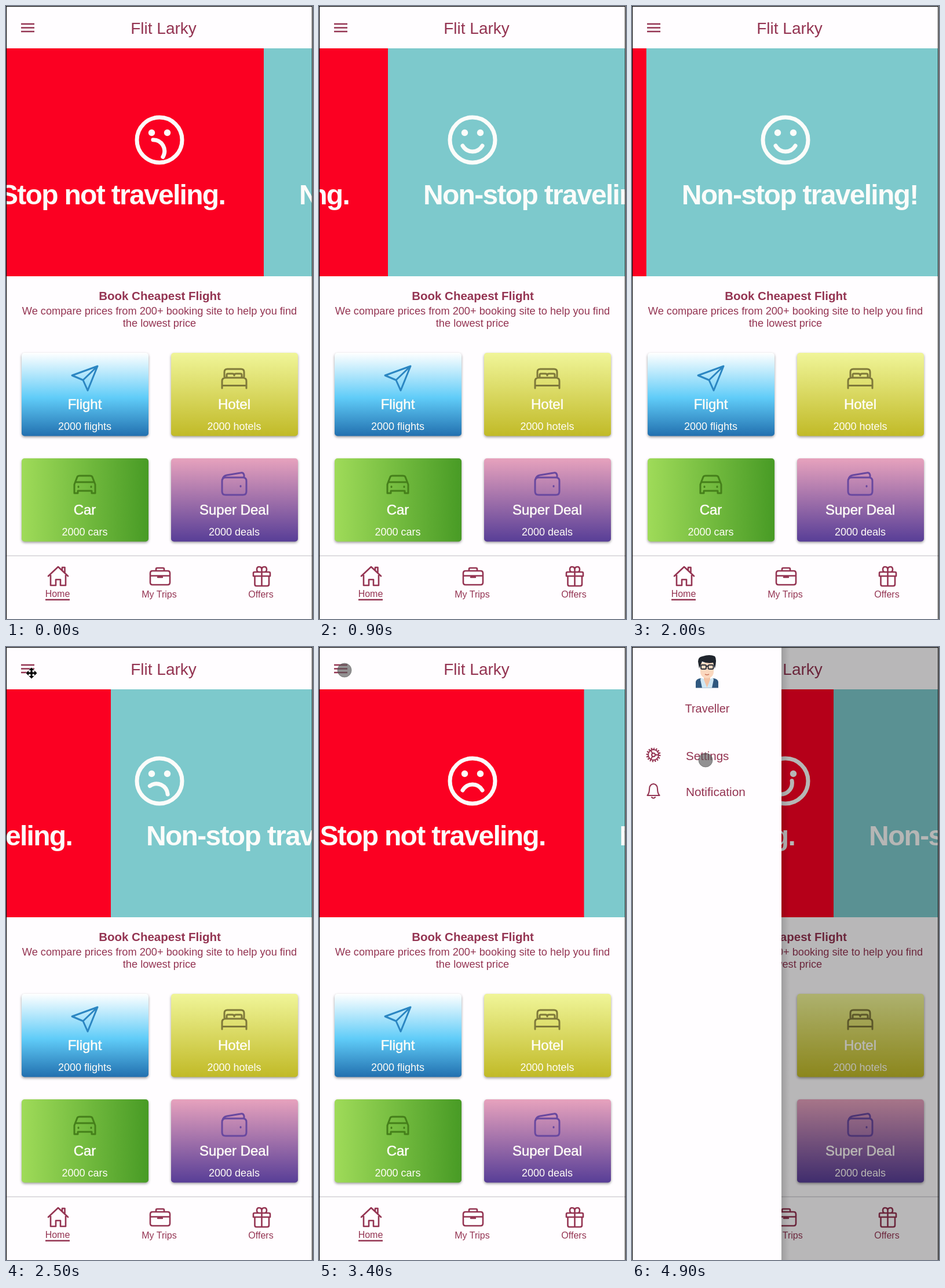
Animation, 530 px wide and 1057 px high, one loop 5000 ms. Source, as an HTML page:

```html
<!DOCTYPE html>
<html lang="en">
<head>
<meta charset="utf-8">
<title>Travel app</title>
<style>
  html, body { margin: 0; width: 100%; height: 100%; overflow: hidden; background: #fffdff; }
  svg { display: block; width: 100%; height: 100%; }
  text { font-family: "Liberation Sans", Arial, sans-serif; fill: #943452; }
  .mid { text-anchor: middle; }
  .line { fill: none; stroke: #943452; stroke-width: 2.6; stroke-linejoin: round; stroke-linecap: round; }
  .slogan { font-size: 48px; font-weight: bold; letter-spacing: -1.7px; fill: #fcfcfa; }
  .name { font-size: 24px; fill: #fffdf8; stroke: #fffdf8; stroke-width: .5; }
  .count { font-size: 18px; fill: #fffdf8; }
  .card { filter: drop-shadow(0 2px 2px rgba(0, 0, 0, .38)); }
  .white { fill: none; stroke: #fcfcfa; stroke-width: 7; stroke-linecap: round; }
</style>
</head>
<body>
<svg viewBox="0 0 530 1057" preserveAspectRatio="none">
  <defs>
    <linearGradient id="sky" x2="0" y2="1">
      <stop offset="0" stop-color="#fff"/><stop offset=".54" stop-color="#60ccf8"/><stop offset="1" stop-color="#2270af"/>
    </linearGradient>
    <linearGradient id="lime" x2="0" y2="1">
      <stop offset="0" stop-color="#f0f599"/><stop offset="1" stop-color="#c1ba27"/>
    </linearGradient>
    <linearGradient id="leaf">
      <stop offset="0" stop-color="#9fdb59"/><stop offset="1" stop-color="#489b25"/>
    </linearGradient>
    <linearGradient id="plum" x2="0" y2="1">
      <stop offset="0" stop-color="#e7a2bd"/><stop offset="1" stop-color="#583e97"/>
    </linearGradient>
    <linearGradient id="shade">
      <stop offset="0" stop-opacity=".14"/><stop offset="1" stop-opacity="0"/>
    </linearGradient>
    <clipPath id="window"><rect x="1" y="73" width="528" height="393"/></clipPath>
  </defs>

  <rect width="530" height="1057" fill="#fffdff"/>
  <path class="line" style="stroke-linecap:butt" d="M26 31H49M26 37.5H49M26 44H49"/>
  <text class="mid" x="272" y="48" font-size="28">Flit Larky</text>

  <g clip-path="url(#window)">
    <rect y="73" width="530" height="393" fill="#fb0022"/>
    <g id="strip">
      <rect y="73" width="560" height="393" fill="#7dc9cc"/>
      <text class="slogan" x="-456" y="342">Stop not traveling.</text>
      <text class="slogan" x="61" y="342">Non-stop traveling!</text>
    </g>
    <circle class="white" cx="265" cy="231" r="39"/>
    <circle cx="251.5" cy="218.5" r="5.7" fill="#fcfcfa"/>
    <circle cx="278.5" cy="218.5" r="5.7" fill="#fcfcfa"/>
    <path id="mouth" class="white" d="M248 247Q254 237 265 237T282 247"/>
  </g>

  <text class="mid" x="265.5" y="507" font-size="20.5" font-weight="bold">Book Cheapest Flight</text>
  <text class="mid" x="265" y="532" font-size="18.2">We compare prices from 200+ booking site to help you find</text>
  <text class="mid" x="265" y="552.5" font-size="18.2">the lowest price</text>

  <g id="cards"></g>

  <rect y="947" width="530" height="2" fill="#dedce0"/>
  <path class="line" d="M73 983L90 967L107 983M77 981V999H86V989H94V999H103V981M97 973V968H101.500V977"/>
  <path class="line" d="M253 974H279Q283 974 283 978V994Q283 998 279 998H253Q249 998 249 994V978Q249 974 253 974M259 974V971Q259 969 261 969H271Q273 969 273 971V974M249 982.500H283M262 985H270"/>
  <path class="line" d="M429 976H454Q456 976 456 978V983H427V978Q427 976 429 976M429.500 983V997Q429.500 1000 432 1000H451Q454 1000 454 997V983M441.500 976V1000M441.500 976H437Q433 976 433 971.500Q433 967 437 967Q441.500 967 441.500 972V976H446Q450 976 450 971.500Q450 967 446 967Q441.500 967 441.500 972"/>
  <g class="mid" font-size="16">
    <text x="89" y="1018.500">Home</text>
    <text x="264.500" y="1020">My Trips</text>
    <text x="440" y="1020">Offers</text>
  </g>
  <rect x="68" y="1022.500" width="42" height="2.500" fill="#943452"/>

  <rect id="dim" width="530" height="1057" opacity="0"/>
  <g id="drawer">
    <rect x="258" width="14" height="1057" fill="url(#shade)"/>
    <rect width="258" height="1057" fill="#fffdff"/>
    <path d="M110 70.500V60Q111 55 118 54L129.500 58L141 54Q148 55 149 60V70.500Z" fill="#30587f"/>
    <path d="M120 53L129.500 59L139 53L141 56L138 70.500H121L118 56Z" fill="#cfe7f4"/>
    <path d="M124 48H135V56L129.500 70L124 56Z" fill="#f2c3a5"/>
    <path d="M118 27H141V42Q141 53 129.500 54Q118 53 118 42Z" fill="#fbd8bf"/>
    <path d="M116 37L114 25Q114 17 122 16Q134 12 143 16Q147 21 143 37L140 27Q130 29 121 25Z" fill="#20252d"/>
    <g fill="none" stroke="#29303a" stroke-width="2">
      <rect x="119" y="31" width="9" height="7" rx="2"/>
      <rect x="131.500" y="31" width="9" height="7" rx="2"/>
      <path d="M128 33H131.500"/>
    </g>
    <path d="M126 47Q129.500 49 133 47" fill="none" stroke="#c9785f" stroke-width="1.500"/>
    <text class="mid" x="130" y="113" font-size="20">Traveller</text>
    <circle class="line" cx="37" cy="186" r="9" style="stroke-width:2"/>
    <circle class="line" cx="37" cy="186" r="11" style="stroke-width:3;stroke-linecap:butt" pathLength="32" stroke-dasharray="1 1"/>
    <path class="line" style="stroke-width:2" d="M40 186H46M35.500 183.400L32.500 178.200M35.500 188.600L32.500 193.800"/>
    <circle class="line" cx="37" cy="186" r="3" style="stroke-width:2"/>
    <path class="line" style="stroke-width:2.100" d="M26.500 256Q30 252 30 245Q30 237 37 236Q44 237 44 245Q44 252 47.500 256ZM34 259Q37 262.500 40 259"/>
    <text x="93" y="195" font-size="20.600">Settings</text>
    <text x="93" y="257" font-size="20.800">Notification</text>
  </g>

  <path id="arrows" d="M0-9.500L4.500-5H1.500V-1.500H5V-4.500L9.500 0L5 4.500V1.500H1.500V5H4.500L0 9.500L-4.500 5H-1.500V1.500H-5V4.500L-9.500 0L-5-4.500V-1.500H-1.500V-5H-4.500Z" stroke="#fff" stroke-width="1" paint-order="stroke"/>
  <circle id="touch" r="12" fill="#555" fill-opacity=".64" stroke="#555" stroke-opacity=".55"/>
  <path d="M.500 1057V.500H528.700V1057" fill="none" stroke="#111" stroke-width="1.300"/>
</svg>
<script>
  const $ = id => document.getElementById(id);

  // x, y, fill, icon colour, icon path (card space), name, count
  const cards = [
    [27, 598, 'sky', '#2b86c2', 'M131 23L87 39L106 47L114 65ZL106 47', 'Flight', '2000 flights'],
    [285, 598, 'lime', '#7f793a', 'M92 43V33Q92 28 97 28H121Q126 28 126 33V43M96 42V38Q96 36 98 36H106Q109 36 109 39Q109 36 112 36H120Q122 36 122 38V42M88 61V49Q88 43 94 43H124Q130 43 130 49V61M88 56.5H130', 'Hotel', '2000 hotels'],
    [27, 780, 'leaf', '#457f1a', 'M91 45L96 32Q97 30 100 30H118Q121 30 122 32L127 45V60H121V56H97V60H91ZM93 41H125M98 48.500V49.500M120 48.500V49.500', 'Car', '2000 cars'],
    [285, 780, 'plum', '#69489f', 'M94 33H124Q130 33 130 39V57Q130 63 124 63H94Q88 63 88 57V39Q88 33 94 33M89 36Q90 30 96 29L120 25Q125 24 126 29V33M120 47.500V48.500', 'Super Deal', '2000 deals']
  ];
  $('cards').innerHTML = cards.map(([x, y, fill, ink, icon, name, count]) => `
    <g transform="translate(${x} ${y})">
      <rect class="card" width="219" height="143.500" rx="5" fill="url(#${fill})"/>
      <path class="line" style="stroke:${ink};stroke-width:3" d="${icon}"/>
      <text class="name mid" x="109" y="97">${name}</text>
      <text class="count mid" x="109" y="133">${count}</text>
    </g>`).join('');

  const edge = [[0, 445], [500, 239], [900, 119], [1300, 14], [1550, 1], [1790, 4], [2350, 105],
    [2500, 181], [3200, 396], [3650, 514], [3850, 527], [4100, 522], [4660, 445], [4900, 348], [5000, 303]];
  const turn = [[0, 60], [240, 140], [420, 180], [2000, 180], [2200, 165], [2350, 105], [2500, 25],
    [2650, 0], [4400, 0], [4660, 60], [4900, 140], [5000, 165]];
  const touchX = [[3400, 44], [4100, 61], [4200, 114], [4500, 125], [4800, 127]];
  const touchY = [[3400, 40], [4100, 84], [4200, 175], [4500, 192], [4800, 195]];

  // Monotone cubic curve through [time, value] points
  function curve(pts, t) {
    const last = pts.length - 1;
    if (t <= pts[0][0]) return pts[0][1];
    if (t >= pts[last][0]) return pts[last][1];
    const slope = i => (pts[i + 1][1] - pts[i][1]) / (pts[i + 1][0] - pts[i][0]);
    const tangent = i => {
      if (i === 0) return slope(0);
      if (i === last) return slope(last - 1);
      const a = slope(i - 1), b = slope(i);
      return a * b <= 0 ? 0 : 2 * a * b / (a + b);
    };
    const i = pts.findIndex(p => p[0] > t) - 1;
    const [t0, v0] = pts[i], [t1, v1] = pts[i + 1];
    const h = t1 - t0, u = (t - t0) / h;
    return v0 + (v1 - v0) * u * u * (3 - 2 * u)
      + h * u * (1 - u) * (tangent(i) * (1 - u) - tangent(i + 1) * u);
  }

  const move = (el, x, y = 0) => el.setAttribute('transform', `translate(${x} ${y})`);
  const show = (el, on) => el.setAttribute('visibility', on ? 'visible' : 'hidden');

  function draw(ms) {
    const t = Math.floor(ms % 5000 / 100) * 100;
    move($('strip'), curve(edge, t));
    $('mouth').setAttribute('transform', `rotate(${curve(turn, t)} 265 244)`);

    const u = Math.min(1, Math.max(0, (t - 3400) / 400));
    const open = 1 - (1 - u) ** 3;
    $('dim').setAttribute('opacity', .28 * open);
    move($('drawer'), -258 * (1 - open));
    show($('drawer'), open > 0);

    show($('arrows'), t >= 2400 && t < 2800);
    move($('arrows'), 44, 45);
    show($('touch'), t >= 2800);
    move($('touch'), curve(touchX, t), curve(touchY, t));
  }

  const start = performance.now();
  function tick() {
    draw(performance.now() - start);
    requestAnimationFrame(tick);
  }
  tick();
</script>
</body>
</html>
```
